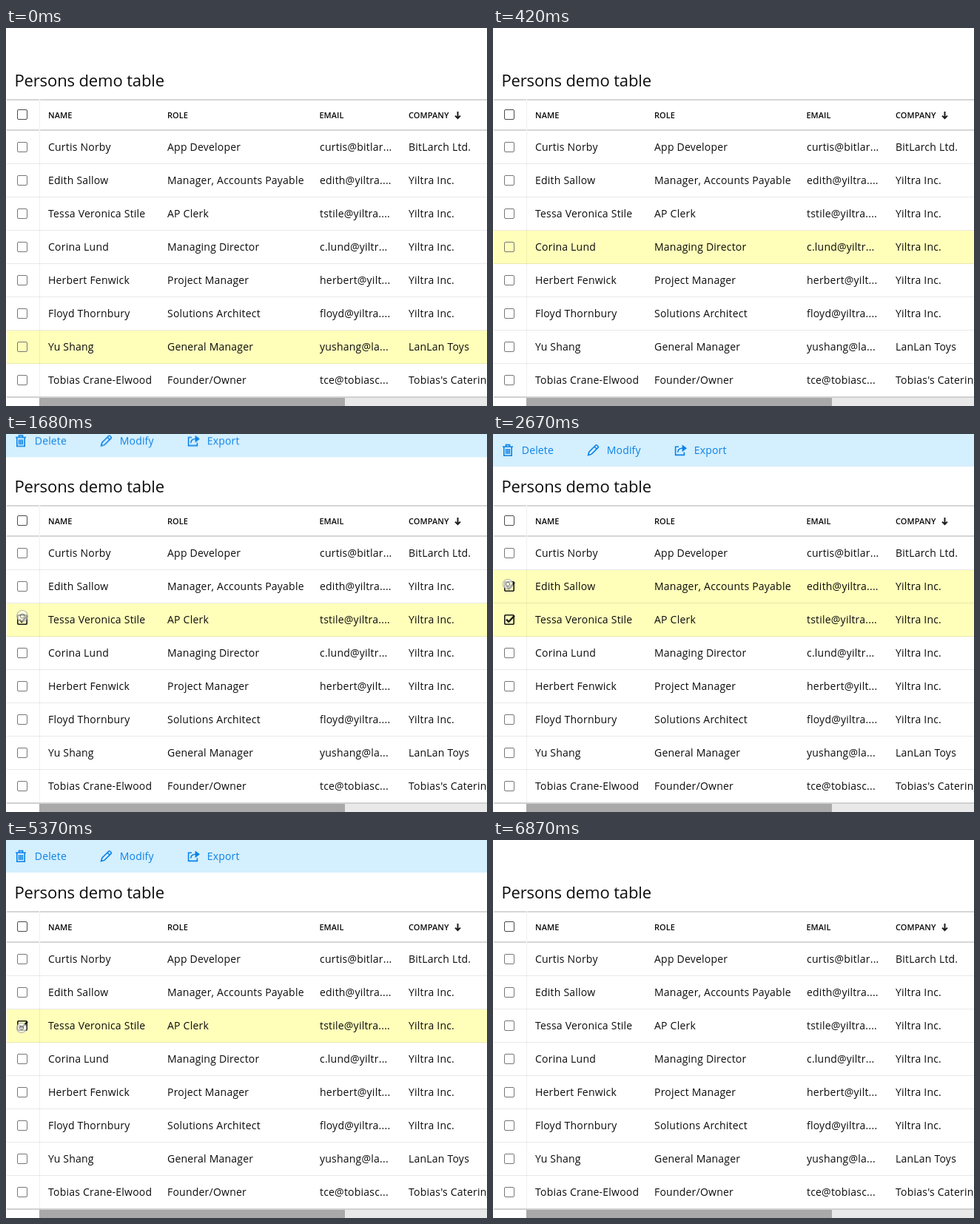
Animation of 650 by 511 pixels, one loop 8280 ms. Source, as an HTML page:

```html
<!DOCTYPE html>
<html lang="en">
<head>
<meta charset="utf-8">
<title>Persons demo table</title>
<style>
  html, body { margin: 0; width: 100%; height: 100%; overflow: hidden; background: #fff; }
  #stage {
    --loop: 8280ms;
    position: relative; width: 650px; height: 511px; overflow: hidden; background: #fff;
    font: 14px/44px "Open Sans", "Noto Sans", sans-serif;
    letter-spacing: .22px; color: #0c0c0c; white-space: pre;
  }
  :where(#stage *) { position: absolute; left: 0; top: 0; box-sizing: border-box; }
  svg { overflow: visible; }
  svg * { position: static; }

  h1 { left: 11.4px; top: 48px; margin: 0; font: 22px/45px "Open Sans", "Noto Sans", sans-serif; letter-spacing: -.12px; }

  /* toolbar */
  #bar {
    width: 650px; height: 44px; background: #d4effe; color: #0b82e6;
    font-weight: 500; letter-spacing: .15px; transform: translateY(-44px);
    animation: slide var(--loop) infinite linear;
  }
  #bar svg { fill: none; stroke: #0b82e6; stroke-width: 1.6; }
  @keyframes slide {
    0% { transform: translateY(-44px); }
    19.384% { transform: translateY(-44px); animation-timing-function: ease; }
    21.558% { transform: none; }
    66.304% { transform: none; animation-timing-function: ease; }
    68.478%, to { transform: translateY(-44px); }
  }

  /* table */
  #head { left: 1px; top: 96px; width: 649px; height: 43px; border: solid #d6d6d6; border-width: 2px 0;
    font-size: 11px; font-weight: 600; line-height: 40px; letter-spacing: .05px; }
  .row { left: 1px; width: 649px; height: 45px; }
  .lit { width: 100%; height: 100%; background: #ffffba; opacity: 0; animation: var(--loop) infinite step-end; }
  .row::after { content: ""; position: absolute; left: 0; right: 0; bottom: 0; height: 1px; background: rgba(0, 0, 0, .085); }
  .c0 { left: 56px; } .c1 { left: 217px; } .c2 { left: 423px; } .c3 { left: 543px; }
  #head .c2 { left: 422.4px; }
  .box { left: 14px; top: 15px; width: 14px; height: 14px; border: 1.3px solid #777; border-radius: 2px; }
  #head .box { left: 13.5px; top: 12px; border: 1.6px solid #4a4a4a; }
  .tick { left: 14px; top: 15px; fill: none; stroke: #1a1a1a; stroke-width: 1.6; opacity: 0;
    animation: var(--loop) infinite step-end; }
  #split { left: 45px; top: 96px; width: 1px; height: 403px; background: #efefef; mix-blend-mode: multiply; }
  .gap { left: 45px; width: 1px; height: 2px; background: #fff; }
  #foot { left: 1px; top: 498px; width: 649px; height: 2px; background: #d0d0d0; }
  #track { left: 45px; top: 500px; width: 605px; height: 11px; background: #e9e9e9; }
  #thumb { width: 413px; height: 11px; background: #a9a9a9; }

  /* row highlights */
  @keyframes lit6 { 0% { opacity: 1; } 1.449%, to { opacity: 0; } }
  @keyframes lit5 { 0% { opacity: 0; } 1.449% { opacity: 1; } 3.985%, to { opacity: 0; } }
  @keyframes lit4 { 0% { opacity: 0; } 3.985% { opacity: 1; } 5.072%, to { opacity: 0; } }
  @keyframes lit3 { 0% { opacity: 0; } 5.072% { opacity: 1; } 11.594%, to { opacity: 0; } }
  @keyframes lit2 { 0% { opacity: 0; } 11.594% { opacity: 1; } 82.97%, to { opacity: 0; } }
  @keyframes lit1 { 0% { opacity: 0; } 26.449% { opacity: 1; } 56.884%, to { opacity: 0; } }
  @keyframes tick2 { 0% { opacity: 0; } 19.565% { opacity: 1; } 66.304%, to { opacity: 0; } }
  @keyframes tick1 { 0% { opacity: 0; } 32.246% { opacity: 1; } 51.811%, to { opacity: 0; } }

  /* pointer taps: hold, then spread and fade */
  .tap { width: 14px; height: 14px; margin: -7px 0 0 -7px; border-radius: 50%; opacity: 0;
    background: rgba(255, 255, 255, .72); border: 1px solid #a2a2a2; animation: var(--loop) infinite linear; }
  .tap::after { content: ""; position: absolute; inset: 3px; border: 1px solid #666; border-radius: 50%; }
  @keyframes tap120 {
    0%, 1.449% { opacity: .92; transform: none; }
    6.159% { opacity: 0; transform: scale(1.85); }
    to { opacity: 0; }
  }
  @keyframes tap150 {
    0%, 1.811% { opacity: .92; transform: none; }
    6.522% { opacity: 0; transform: scale(1.85); }
    to { opacity: 0; }
  }
  @keyframes tap180 {
    0%, 2.174% { opacity: .92; transform: none; }
    6.884% { opacity: 0; transform: scale(1.85); }
    to { opacity: 0; }
  }
</style>
</head>
<body>
<div id="stage">
  <div id="bar">
    <svg width="650" height="44">
      <path d="M13 17.3H27M17.5 17V14.6H22.5V17M14.8 18V29.3H25.2V18M17.7 20V27M20 20V27M22.3 20V27"/>
      <path d="M128.6 28.6L129.8 24.2L138.8 15.2Q139.6 14.4 140.4 15.2L142 16.8Q142.8 17.6 142 18.4L133 27.4ZM137 17L140.2 20.2"/>
      <path d="M251 17.2H246.6V28.4H258.4V24.5M249.8 24.8Q250 19.3 256 19.3"/>
      <path d="M255.6 14.4L262 19.3L255.6 24.2Z" fill="#0b82e6" stroke="none"/>
    </svg>
    <span style="left:38.8px">Delete</span>
    <span style="left:153.8px">Modify</span>
    <span style="left:271.8px">Export</span>
  </div>
  <h1>Persons demo table</h1>
  <div id="head">
    <i class="box"></i>
    <span class="c0">NAME</span><span class="c1">ROLE</span><span class="c2">EMAIL</span><span class="c3">COMPANY</span>
    <svg style="left:604px;top:14px" width="11" height="12"><path d="M5.5 1V10M2 6.6L5.5 10L9 6.6" fill="none" stroke="#1c1c1c" stroke-width="2"/></svg>
  </div>
  <div id="rows"></div>
  <i id="split"></i>
  <i class="gap" style="top:96px"></i><i class="gap" style="top:137px"></i>
  <i id="foot"></i>
  <div id="track"><i id="thumb"></i></div>
  <i class="tap" style="left:22px;top:246px;animation-name:tap150;animation-delay:1470ms"></i>
  <i class="tap" style="left:20px;top:202.5px;animation-name:tap180;animation-delay:2490ms"></i>
  <i class="tap" style="left:20px;top:202.5px;animation-name:tap120;animation-delay:4170ms"></i>
  <i class="tap" style="left:21px;top:254px;animation-name:tap120;animation-delay:5370ms"></i>
</div>
<script>
  const people = [
    ["Curtis Norby", "App Developer", "curtis@bitlar...", "BitLarch Ltd."],
    ["Edith Sallow", "Manager, Accounts Payable", "edith@yiltra....", "Yiltra Inc."],
    ["Tessa Veronica Stile", "AP Clerk", "tstile@yiltra....", "Yiltra Inc."],
    ["Corina Lund", "Managing Director", "c.lund@yiltr...", "Yiltra Inc."],
    ["Herbert Fenwick", "Project Manager", "herbert@yilt...", "Yiltra Inc."],
    ["Floyd Thornbury", "Solutions Architect", "floyd@yiltra....", "Yiltra Inc."],
    ["Yu Shang", "General Manager", "yushang@la...", "LanLan Toys"],
    ["Tobias Crane-Elwood", "Founder/Owner", "tce@tobiasc...", "Tobias's Catering"]
  ];
  const tick = i => `<svg class="tick" style="animation-name:tick${i}" width="14" height="14">
    <rect x=".8" y=".8" width="12.4" height="12.4" rx="1.5"/>
    <path d="M3 6.6L6.2 9.9L14 1.6" stroke-width="2.3"/></svg>`;
  const cells = texts => texts.map((text, i) => `<span class="c${i}">${text}</span>`).join("");

  document.getElementById("rows").innerHTML = people.map((texts, i) =>
    `<div class="row" style="top:${139 + 45 * i}px">` +
    `<i class="lit" style="animation-name:lit${i}"></i><i class="box"></i>` +
    (i === 1 || i === 2 ? tick(i) : "") + cells(texts) + "</div>").join("");
</script>
</body>
</html>
```
